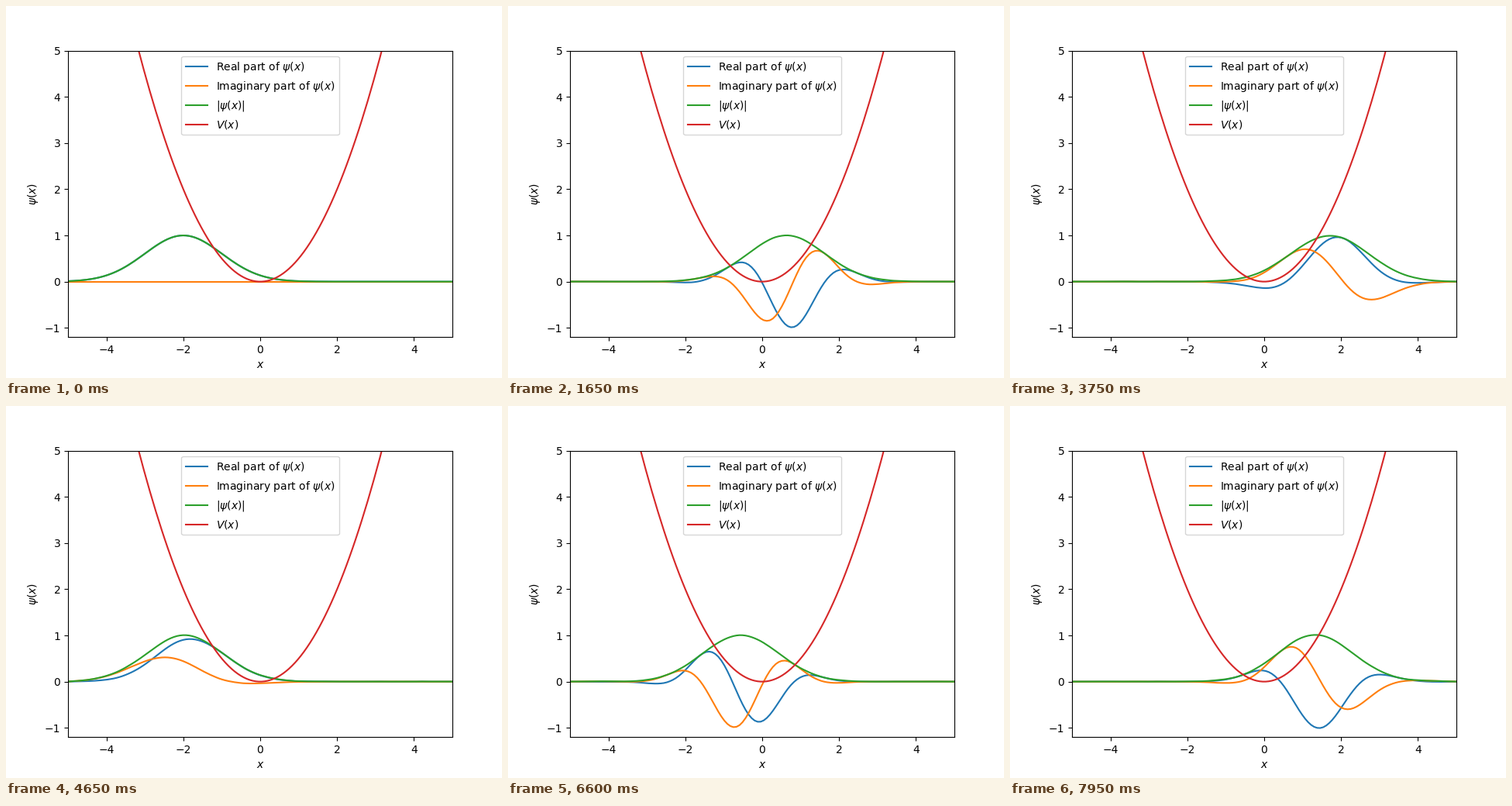
A matplotlib script for the animation above (8000 ms loop, 640x480 px).

```python
import numpy as np
import matplotlib.pyplot as plt
from matplotlib.animation import FuncAnimation

TICK_MS = 50
LOOP_MS = 8000
TICKS_PER_STEP = 3
TIME_STEP = 0.4
POINTS = 128

# Wave packet in a harmonic well, on a finite-difference grid
x = np.linspace(-5, 5, POINTS)
dx = x[1] - x[0]
potential = x**2 / 2
hop = np.full(POINTS - 1, -0.5 / dx**2)
hamiltonian = np.diag(potential + 1 / dx**2) + np.diag(hop, 1) + np.diag(hop, -1)
energies, modes = np.linalg.eigh(hamiltonian)
weights = modes.T @ np.exp(-(x + 2)**2 / 2)


def wave(step):
    return modes @ (weights * np.exp(-1j * energies * TIME_STEP * step))


fig, ax = plt.subplots(figsize=(6.4, 4.8), dpi=100)
real_line, = ax.plot([], [], label=r"Real part of $\psi(x)$")
imag_line, = ax.plot([], [], label=r"Imaginary part of $\psi(x)$")
abs_line, = ax.plot([], [], label=r"$|\psi(x)|$")
ax.plot(x, potential, label=r"$V(x)$")
ax.set(xlim=(-5, 5), ylim=(-1.2, 5), xlabel=r"$x$", ylabel=r"$\psi(x)$")
ax.legend(loc="upper center")


def update(tick):
    psi = wave(tick // TICKS_PER_STEP)
    real_line.set_data(x, psi.real)
    imag_line.set_data(x, psi.imag)
    abs_line.set_data(x, np.abs(psi))
    return real_line, imag_line, abs_line


animation = FuncAnimation(fig, update, frames=LOOP_MS // TICK_MS,
                          interval=TICK_MS, repeat=True, repeat_delay=0)
plt.show()
```
